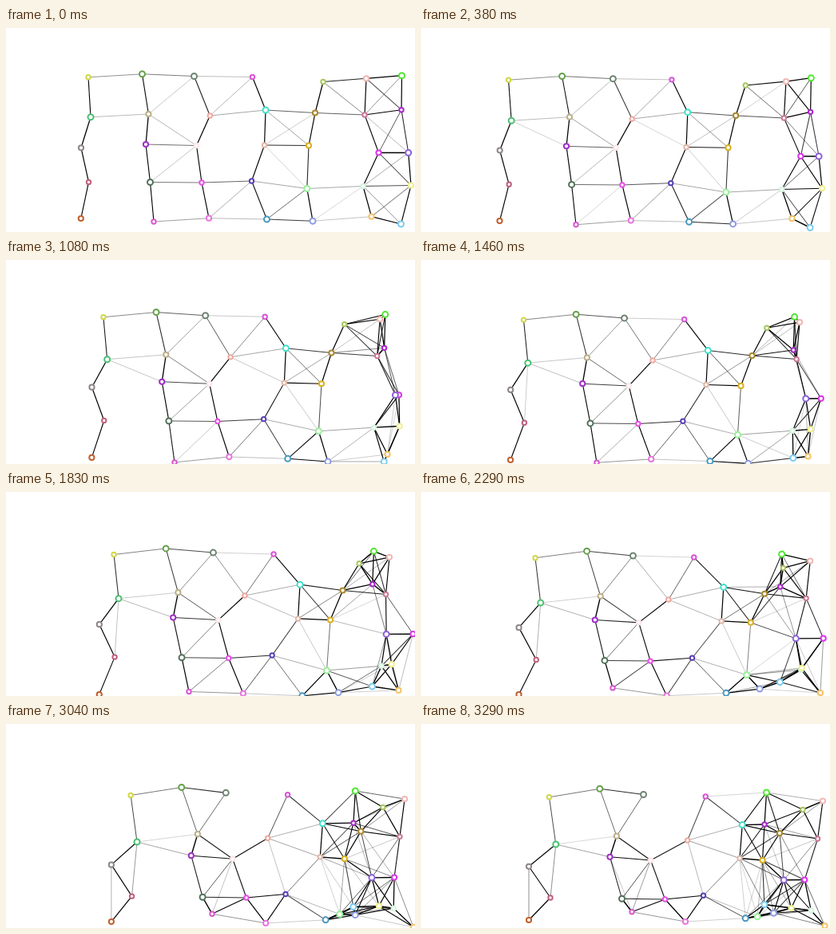
Animation, 512 px wide and 256 px high, one loop 3.33 s. Source, as an HTML page with a canvas:

```html
<!DOCTYPE html>
<html lang="en">
<head>
<meta charset="utf-8">
<title>Drifting network</title>
<style>
  html, body { margin: 0; width: 100%; height: 100%; overflow: hidden; background: #fff; }
  canvas { display: block; width: 512px; height: 256px; }
</style>
</head>
<body>
<canvas id="stage" width="512" height="256"></canvas>
<script>
const W = 512, H = 256;
const LOOP = 3330, FPS = 24, LAST = 79;
const REACH = 76.8;
const ctx = document.getElementById('stage').getContext('2d');

// Ring radius -> rows of colour, start x, start y, travel x, travel y over one loop
const groups = [
  [2.7, [
    ['#d0d84a', 103, 61.8, 57.5, 30],
    ['#c0607c', 103.5, 193.4, 58.5, 24.6],
    ['#d858d0', 185, 243, 79, 33.2],
    ['#f0a8a0', 255.3, 110, 78.3, 36],
    ['#fbe6e8', 238.5, 147.5, 49, 23.5],
    ['#e850e8', 245, 194, 60.5, 26],
    ['#d855d8', 308.5, 61.5, 47.7, 29.5],
    ['#e0b8a8', 323.5, 147, 75.5, 21.5],
    ['#5c40b8', 307.5, 192, 46, 23.3],
    ['#a8c860', 397, 67.5, 81, 40],
    ['#cc7898', 449, 109, 47.6, 35],
    ['#d4f5dc', 447, 198.5, 41.3, 35.5],
    ['#a828c8', 495, 102.7, -65, 23.3]
  ]],
  [3.1, [
    ['#8f8686', 94, 150.3, 41, 28.5],
    ['#c06030', 93.8, 239, 41.2, 27],
    ['#bdb08a', 178.4, 108, 66.5, 32.7],
    ['#a030c8', 175, 146, 61.5, 20.8],
    ['#e878e0', 254, 238.7, 77, 25.3],
    ['#a8882c', 387, 106.5, 62, 30.5],
    ['#d8b020', 379, 147.5, 48.5, 23.5],
    ['#f0b8b4', 451, 63.3, 52, 33.3],
    ['#d838e8', 466.5, 156.5, 77.3, 39],
    ['#f4c468', 457.5, 236.7, 61, 22],
    ['#f0f090', 507, 197.5, -43.5, 33.5]
  ]],
  [3.5, [
    ['#4ac070', 106, 111.8, 62.8, 39.2],
    ['#66a04c', 170.5, 57.8, 53.3, 23.5],
    ['#507058', 180.5, 193.5, 71, 25.7],
    ['#6c8470', 235.5, 60.5, 43, 28],
    ['#40e0cc', 325, 103, 77.2, 23.6],
    ['#4898c0', 326.5, 240, 79.7, 28.3],
    ['#98f098', 376.8, 201.5, 44.4, 40.3],
    ['#8c9ce0', 384, 242.2, 57.5, 32.6],
    ['#50e830', 495.5, 59.7, -63, 26.3],
    ['#8c60d8', 503.7, 156.5, -49.5, 39.3],
    ['#78ccf0', 494.5, 246, -64.7, 39.5]
  ]]
];

const nodes = groups.flatMap(([r, rows]) =>
  rows.map(([color, x, y, dx, dy]) => ({ r, color, x, y, dx, dy })));

// Reflect a coordinate off the far wall
const bounce = (v, wall) => wall - Math.abs(wall - v);

// Step index at 24 steps a second, on a 10 ms clock
function stepAt(ms) {
  const tick = Math.floor(ms / 10) * 10;
  return Math.min(LAST, Math.ceil((tick + 5) * FPS / 1000 - 1e-9) - 1);
}

function drawLink(a, b) {
  const d = Math.hypot(a.x - b.x, a.y - b.y);
  if (d >= REACH) return;
  const alpha = 0.2 + 0.8 * Math.min(1, (REACH - d) / 27);
  ctx.strokeStyle = `rgba(0,0,0,${alpha})`;
  ctx.lineWidth = 0.8 + 0.9 * (1 - d / REACH);
  ctx.beginPath();
  ctx.moveTo(a.x, a.y);
  ctx.lineTo(b.x, b.y);
  ctx.stroke();
}

function drawRing({ x, y, r, color }) {
  ctx.beginPath();
  ctx.arc(x, y, r, 0, Math.PI * 2);
  ctx.fillStyle = '#fff';
  ctx.fill();
  ctx.strokeStyle = color;
  ctx.lineWidth = 2;
  ctx.stroke();
}

function draw(ms) {
  const p = stepAt(ms) / LAST;
  const now = nodes.map(n => ({
    r: n.r,
    color: n.color,
    x: bounce(n.x + n.dx * p, W),
    y: bounce(n.y + n.dy * p, H)
  }));
  ctx.fillStyle = '#fff';
  ctx.fillRect(0, 0, W, H);
  now.forEach((a, i) => now.slice(i + 1).forEach(b => drawLink(a, b)));
  now.forEach(drawRing);
}

const start = performance.now();
function tick() {
  draw((performance.now() - start) % LOOP);
  requestAnimationFrame(tick);
}
tick();
</script>
</body>
</html>
```
